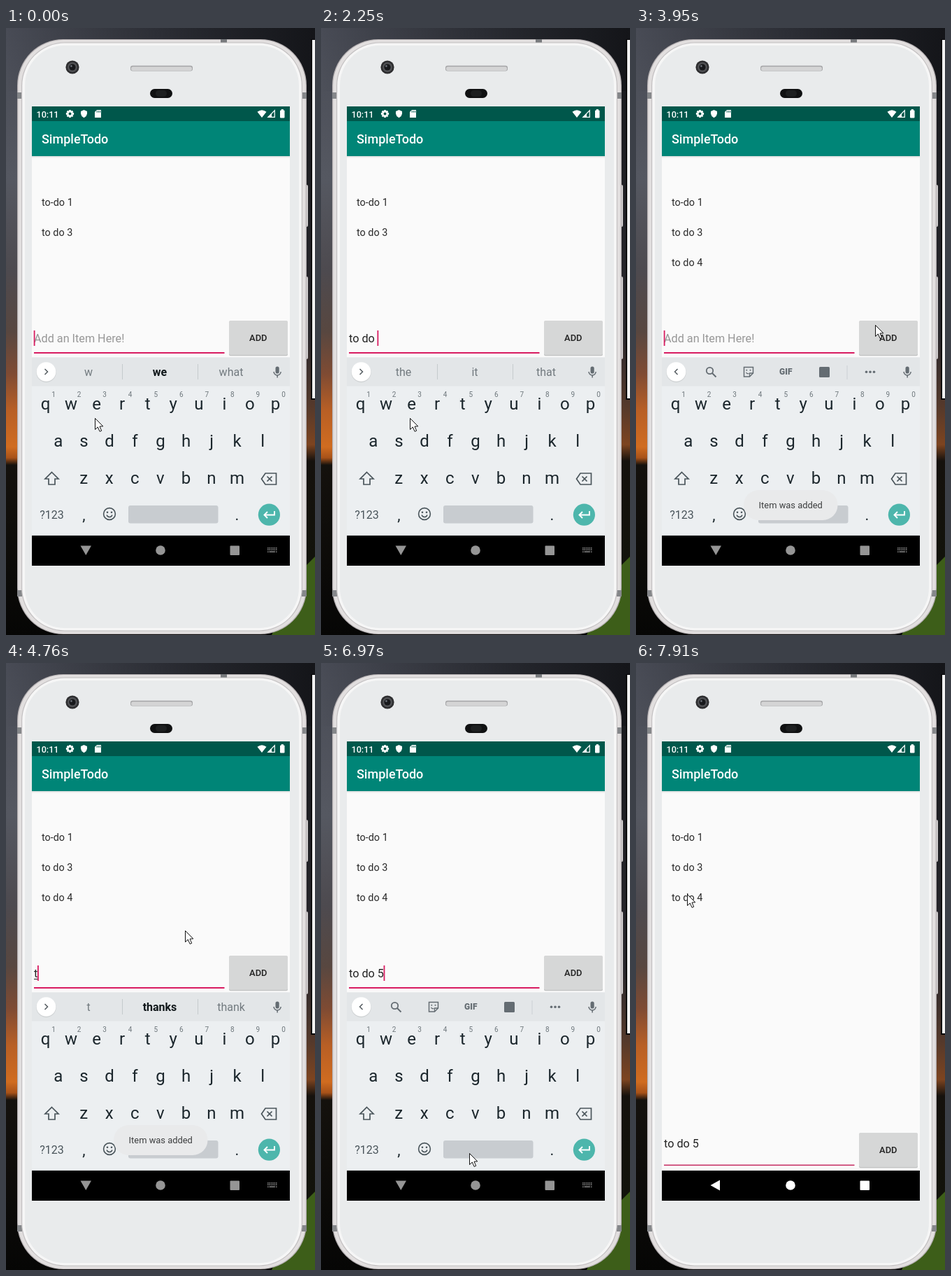
An HTML page with a canvas that plays this animation: 442x867 px, repeating every 8000 ms.

```html
<!DOCTYPE html>
<html lang="en">
<head>
<meta charset="utf-8">
<title>To-do list on a phone</title>
<style>
html, body { margin: 0; width: 100%; height: 100%; overflow: hidden; background: #111; }
canvas { display: block; width: 442px; height: 867px; }
</style>
</head>
<body>
<canvas id="stage" width="442" height="867"></canvas>
<script>
const W = 442, H = 867, LOOP = 8000;
const g = document.getElementById('stage').getContext('2d');
const FONT = 'Roboto, "Noto Sans", sans-serif';
const PINK = '#d81b60', ICON = '#646c72';

// Each cue changes part of the state from its time on.
const cues = [
  [0, { text: '', under: 0, on: 1, words: ['w', 'we', 'what'], bold: 1, tools: 0,
        items: 2, press: 0, toast: 0, stage: 'open' }],
  [130, { text: 't', under: 1 }],
  [270, { words: ['t', 'thanks', 'thank'] }],
  [400, { text: 'to', under: 2 }],
  [560, { words: ['to', 'too', 'tomorrow'] }],
  [700, { text: 'to ', under: 0, words: ['the', 'be', 'get'], bold: 0 }],
  [850, { text: 'to d', under: 1, words: ['d', 'do', 'did'], bold: 1 }],
  [990, { text: 'to do', under: 2, words: ['do', 'don\u2019t', 'doing'] }],
  [1260, { text: 'to do ', under: 0, words: ['the', 'it', 'that'], bold: 0 }],
  [1690, { on: 0 }],
  [2250, { on: 1 }],
  [2370, { text: 'to do 4' }],
  [2520, { tools: 1 }],
  [3000, { on: 0 }],
  [3430, { on: 1 }],
  [3560, { press: 0.08 }],
  [3680, { text: '', items: 3, press: 0.1, toast: 0.4 }],
  [3810, { press: 0.05, toast: 1 }],
  [3950, { press: 0 }],
  [4210, { on: 0 }],
  [4620, { on: 1, text: 't', under: 1 }],
  [4760, { tools: 0, words: ['t', 'thanks', 'thank'], bold: 1 }],
  [5070, { text: 'to', under: 2, words: ['to', 'too', 'tomorrow'] }],
  [5210, { text: 'to ', under: 0, words: ['the', 'be', 'get'], bold: 0 }],
  [5350, { text: 'to d', under: 1, words: ['d', 'do', 'did'], bold: 1 }],
  [5490, { text: 'to do', under: 2, words: ['do', 'don\u2019t', 'doing'] }],
  [5760, { text: 'to do ', under: 0, words: ['the', 'it', 'that'], bold: 0, toast: 0.9 }],
  [5910, { text: 'to do 5', tools: 1, toast: 0.5 }],
  [6030, { toast: 0 }],
  [6270, { on: 0 }],
  [6700, { on: 1 }],
  [7230, { on: 0 }],
  [7640, { stage: 'closing' }],
  [7790, { stage: 'closed' }]
];

// Pointer: time, x, y, held until the next entry.
const path = [
  [0, 127, 557], [2700, 165, 532], [2850, 246, 478], [3000, 330, 420], [3190, 382, 390],
  [3310, 351, 433], [3950, 342, 424], [4080, 318, 408], [4210, 290, 395], [4340, 265, 386],
  [4490, 256, 382], [6700, 250, 425], [6830, 236, 560], [6960, 212, 700], [7090, 194, 777],
  [7230, 135, 756], [7360, 113, 738], [7790, 92, 520], [7910, 73, 330]
];

function stateAt(t) {
  const s = {};
  for (const [at, part] of cues) if (at <= t) Object.assign(s, part);
  s.mouse = path.filter(p => p[0] <= t).pop();
  return s;
}

function rect(x, y, w, h, color, r = 0) {
  g.fillStyle = color;
  g.beginPath();
  g.roundRect(x, y, w, h, r);
  g.fill();
}
function disc(x, y, r, color) {
  g.fillStyle = color;
  g.beginPath();
  g.arc(x, y, r, 0, Math.PI * 2);
  g.fill();
}
function ring(x, y, r, color, lw) {
  g.strokeStyle = color;
  g.lineWidth = lw;
  g.beginPath();
  g.arc(x, y, r, 0, Math.PI * 2);
  g.stroke();
}
function trace(pts) {
  g.beginPath();
  pts.forEach(([x, y]) => g.lineTo(x, y));
}
function poly(pts, color) {
  trace(pts);
  g.closePath();
  g.fillStyle = color;
  g.fill();
}
function line(pts, color, lw, close) {
  trace(pts);
  if (close) g.closePath();
  g.strokeStyle = color;
  g.lineWidth = lw;
  g.stroke();
}
function label(str, x, y, size, color, weight = 400, align = 'left') {
  g.font = `${weight} ${size}px ${FONT}`;
  g.textAlign = align;
  g.fillStyle = color;
  g.fillText(str, x, y);
}
const centered = (str, x, y, size, color, weight) => label(str, x, y, size, color, weight, 'center');
function at(x, y, draw) {
  g.save();
  g.translate(x, y);
  draw();
  g.restore();
}
function faded(alpha, draw) {
  g.save();
  g.globalAlpha = alpha;
  draw();
  g.restore();
}
function blend(x0, y0, x1, y1, stops) {
  const b = g.createLinearGradient(x0, y0, x1, y1);
  stops.forEach(([p, c]) => b.addColorStop(p, c));
  return b;
}

function wallpaper() {
  rect(0, 0, W, H, blend(0, 0, 0, H, [
    [0, '#484b55'], [0.25, '#555861'], [0.4, '#4d4a4f'], [0.5, '#584740'], [0.57, '#7f4b33'],
    [0.63, '#b85f25'], [0.69, '#d06c20'], [0.708, '#a85219'], [0.72, '#14110d'], [1, '#060605']]));
  rect(0, 0, W, 90, blend(0, 0, W, 0, [[0, 'rgba(15,16,20,0)'], [0.6, 'rgba(15,16,20,.6)'], [1, '#141519']]));
  rect(415, 90, 27, H - 90, blend(0, 90, 0, H, [
    [0, '#1a1b1f'], [0.45, '#2a282d'], [0.58, '#55392b'], [0.65, '#7d4420'], [0.68, '#15110d'], [1, '#10140a']]));
  poly([[442, 755], [425, 772], [380, 867], [442, 867]], '#3d5e19');
  rect(436, 16, 6, 515, '#08080a');
  rect(438, 17, 4, 512, '#f1f1f1');
}

function phone() {
  rect(427, 224, 5, 60, '#c9c5c6', 2);
  rect(427, 355, 5, 118, '#c9c5c6', 2);
  rect(428, 226, 2.5, 56, '#e6e4e4', 1);
  rect(428, 357, 2.5, 114, '#e6e4e4', 1);
  rect(16, 16, 414, 850, '#b5b0b2', 66);
  rect(17.3, 17, 411.4, 848, '#e2dfdf', 65);
  for (const y of [92, 803]) {
    rect(16, y, 7, 9, '#85878a');
    rect(423, y, 7, 9, '#85878a');
  }
  rect(307, 16, 9, 5, '#77797c');
  rect(22, 20.5, 402, 841, '#c2bfc0', 62);
  rect(23.2, 21.5, 399.6, 839, '#f6f6f6', 61);
  rect(27, 25, 392, 832, '#e9ebec', 57);

  disc(95, 56, 9.6, '#2d2d2f');
  disc(95, 56, 7, '#515255');
  disc(95, 56, 4.6, '#17181b');
  disc(93.4, 54.4, 1.3, '#6d727a');
  rect(178, 53.7, 89, 7.8, '#a5a5a7', 3);
  rect(179, 55.3, 87, 5.6, '#d4d4d5', 2.5);
  rect(206, 87, 32, 13, '#101112', 6.5);
  rect(214, 89, 16, 9, '#1d1f20', 4.5);
}

function statusBar() {
  rect(37, 112, 369, 21, '#00574b');
  label('10:11', 43.5, 127.5, 12.6, '#fff', 500);
  at(91.5, 122.5, () => {
    for (let i = 0; i < 4; i++) {
      g.rotate(Math.PI / 4);
      rect(-1.4, -5.6, 2.8, 11.2, '#fff', 0.5);
    }
    disc(0, 0, 4.2, '#fff');
    disc(0, 0, 1.9, '#00574b');
  });
  poly([[111.5, 117], [116, 119], [116, 122.5], [114.6, 126], [111.5, 128.3], [108.4, 126], [107, 122.5], [107, 119]], '#fff');
  poly([[130, 117], [136, 117], [136, 128], [127, 128], [127, 120]], '#fff');
  for (const x of [129.7, 131.9, 134.1]) rect(x, 118.3, 1, 2.4, '#00574b');
  g.fillStyle = '#fff';
  g.beginPath();
  g.moveTo(366, 128);
  g.lineTo(359.5, 119.8);
  g.quadraticCurveTo(366, 114.5, 372.5, 119.8);
  g.fill();
  line([[384.3, 117.8], [384.3, 127.3], [374.8, 127.3]], '#fff', 1.2, true);
  poly([[380, 122], [380, 127], [375.2, 127]], '#fff');
  rect(392, 117.5, 6.5, 11, '#fff', 1);
  rect(393.8, 116, 3, 2, '#fff');
}

// The input row sits above the keyboard, or at the bottom once it is gone.
function form(s) {
  const open = s.stage === 'open', base = open ? 449 : 692, top = open ? 418 : 671;
  if (s.text) label(s.text, 40, base, 16.2, '#232323');
  else label('Add an Item Here!', 40, base, 16.2, '#979797');
  g.font = `400 16.2px ${FONT}`;
  const end = 40 + g.measureText(s.text).width;
  if (s.under) {
    const w = g.measureText(s.text.slice(-s.under)).width;
    rect(end - w, 451, w, 1, '#232323');
  }
  if (open && s.on) rect(end - 0.3, 432, 1.8, 22, PINK);
  if (open) rect(40, 463, 272.5, 2, PINK);
  else rect(40, 716.5, 272.5, 1.5, '#c62d62');
  rect(319, top + 0.7, 84, 49.5, '#bfc0c0', 2);
  rect(319, top, 84, 49, '#d6d7d7', 2);
  if (s.press) rect(319, top, 84, 49, `rgba(0,0,0,${s.press})`, 2);
  centered('ADD', 360.8, top + 29, 12.9, '#222', 500);
}

function app(s) {
  rect(37, 133, 369, 592, '#fafafa');
  ['to-do 1', 'to do 3', 'to do 4'].slice(0, s.items)
    .forEach((str, i) => label(str, 51, 253.5 + i * 43, 14.4, '#2a2a2a'));
  form(s);
  rect(37, 183, 369, 3, blend(0, 183, 0, 186, [[0, 'rgba(0,0,0,.12)'], [1, 'rgba(0,0,0,0)']]));
  rect(37, 133, 369, 50, '#008577');
  label('SimpleTodo', 51, 165, 18, '#fff', 500);
}

function mic() {
  rect(385.5, 483.5, 5.2, 10, ICON, 2.6);
  g.strokeStyle = ICON;
  g.lineWidth = 1.5;
  g.beginPath();
  g.arc(388.1, 491, 5, 0, Math.PI);
  g.stroke();
  rect(387.4, 496, 1.5, 3.5, ICON);
}

function chevron(dir) {
  disc(57.5, 492, 14.2, '#d0d3d5');
  disc(57.5, 491, 13.8, '#fff');
  line([[57.5 - 2 * dir, 487], [57.5 + 2 * dir, 491], [57.5 - 2 * dir, 495]], '#545b60', 1.5);
}

function tools() {
  ring(105.5, 489.5, 4.7, ICON, 1.8);
  line([[109, 493], [114.5, 498.5]], ICON, 2);
  line([[154.5, 484.5], [167.5, 484.5], [167.5, 493], [162.5, 498], [154.5, 498]], ICON, 1.5, true);
  line([[167.5, 493], [162.5, 493], [162.5, 498]], ICON, 1.3);
  disc(158.3, 488.8, 1, ICON);
  disc(163.5, 488.8, 1, ICON);
  line([[157.5, 492], [159, 493.6], [161.5, 493.6]], ICON, 1.2);
  centered('GIF', 214.3, 495.3, 12, ICON, 900);
  rect(262, 484, 15, 15, ICON, 1.5);
  rect(301.5, 482, 1, 20, '#cbd0d3');
  for (const x of [329.5, 335, 340.5]) disc(x, 491.3, 1.8, ICON);
}

function words(s) {
  [118, 220, 322].forEach((x, i) => {
    const strong = i === 1 && s.bold;
    centered(s.words[i], x, 497.3, 16, strong ? '#10171a' : '#727a7f', strong ? 700 : 400);
  });
  rect(166, 480, 1, 22, '#c5cacd');
  rect(274, 480, 1, 22, '#c5cacd');
}

function keys() {
  const ink = '#1b262c', pitch = 36.55;
  const row = (str, x, y) => [...str].forEach((c, i) => centered(c, x + i * pitch, y, 24, ink));
  row('qwertyuiop', 56.5, 545);
  [...'1234567890'].forEach((c, i) => centered(c, 68 + i * pitch, 527.3, 10, '#6d767b'));
  row('asdfghjkl', 74.8, 598);
  row('zxcvbnm', 111.2, 651);
  const edge = '#4a555b';
  line([[65.5, 634.5], [75, 644], [70, 644], [70, 652], [61, 652], [61, 644], [56, 644]], edge, 1.7, true);
  line([[371, 636], [386.5, 636], [386.5, 652], [371, 652], [365.5, 644]], edge, 1.7, true);
  line([[373.5, 640.5], [380.5, 647.5]], edge, 1.7);
  line([[380.5, 640.5], [373.5, 647.5]], edge, 1.7);
  centered('?123', 65.5, 700.5, 16, edge);
  centered(',', 111.5, 702.5, 22, ink);
  centered('.', 330.5, 703, 22, ink);
  ring(148, 694, 8.4, edge, 1.6);
  disc(145, 691.8, 1.3, edge);
  disc(151, 691.8, 1.3, edge);
  g.beginPath();
  g.arc(148, 694.5, 4, 0.25, Math.PI - 0.25);
  g.stroke();
  rect(175, 682, 128.5, 25.5, '#c8ccd0', 3);
  disc(376.4, 695.2, 15.6, '#4db6ac');
  line([[384, 690], [384, 695.5], [369.5, 695.5]], '#fff', 1.9);
  line([[374, 691], [369.5, 695.5], [374, 700]], '#fff', 1.9);
}

function keyboard(s) {
  rect(37, 470.5, 369, 254.5, '#eceff1');
  rect(37, 470.5, 369, 41, '#e3e6e8');
  chevron(s.tools ? -1 : 1);
  if (s.tools) tools(); else words(s);
  mic();
  keys();
  rect(37, 723, 369, 2, '#e2e5e7');
}

function navBar(s) {
  const open = s.stage === 'open', color = open ? '#959595' : s.stage === 'closing' ? '#cfcfcf' : '#fff';
  rect(37, 725, 369, 43, '#000');
  if (s.stage === 'closing') rect(68.5, 725, 91, 43, '#333', 21.5);
  if (s.stage === 'closed') poly([[106.5, 746], [120, 738.5], [120, 753.5]], color);
  else poly([[106.5, 739.5], [122, 739.5], [114.3, 753]], open ? color : '#8d8d8d');
  disc(221, 746, 6.8, color);
  rect(320.5, 739.5, 13.5, 13.5, color, 1);
  if (!open) return;
  for (let r = 0; r < 2; r++)
    for (let c = 0; c < 6; c++) rect(374 + c * 2.4, 742 + r * 2.6, 1.5, 1.5, '#8c8c8c');
  rect(374, 747.4, 1.5, 1.5, '#8c8c8c');
  rect(376.5, 747.4, 8.4, 1.5, '#8c8c8c');
  rect(386, 747.4, 1.5, 1.5, '#8c8c8c');
}

function toast() {
  rect(154, 660, 134.5, 43, '#e9eaeb', 21.5);
  centered('Item was added', 221.2, 686, 12.9, '#3b3d3e');
}

function pointer([, x, y]) {
  at(x + 0.5, y + 0.5, () => {
    const arrow = [[0, 0], [0, 16], [3.8, 12.5], [6.6, 18.8], [9.2, 17.7], [6.5, 11.6], [11.3, 11.4]];
    poly(arrow, '#fff');
    line(arrow, '#111', 1, true);
  });
}

function draw(t) {
  const s = stateAt(t);
  wallpaper();
  phone();
  app(s);
  statusBar();
  navBar(s);
  if (s.stage === 'open') keyboard(s);
  if (s.stage === 'closing') faded(0.98, () => at(0, 2, () => keyboard(s)));
  if (s.toast) faded(s.toast, toast);
  pointer(s.mouse);
}

const start = performance.now();
function tick() {
  draw((performance.now() - start) % LOOP);
  requestAnimationFrame(tick);
}
tick();
</script>
</body>
</html>
```
